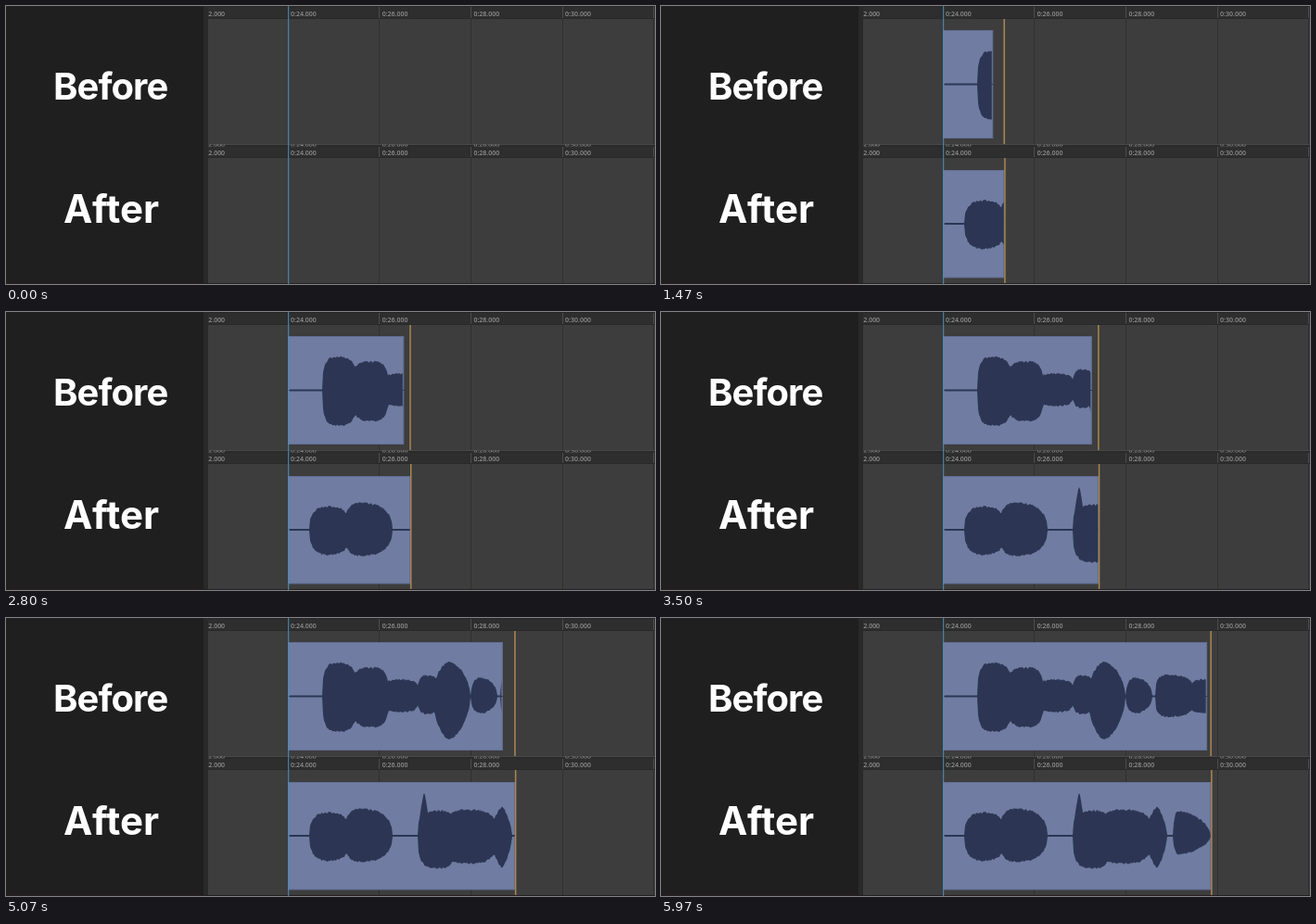
Write an HTML page that moves like this. It is 700 by 300 pixels and loops after 6030 ms.

```html
<!DOCTYPE html>
<html lang="en">
<head>
<meta charset="utf-8">
<title>Before / After</title>
<style>
  html, body { margin: 0; width: 100%; height: 100%; overflow: hidden; background: #1f1f1f; }
  svg { display: block; width: 700px; height: 300px; }
  .title { font-family: Inter, sans-serif; font-weight: 700; fill: #fff; }
  .tick { font: 600 7px "Open Sans", sans-serif; fill: #939393; }
</style>
</head>
<body>
<svg id="stage" viewBox="0 0 700 300"></svg>
<script>
const LOOP = 6030;
const CLIP_LEFT = 304.5;
const CHUNK = 17.76;
const SPEED = .0491;
const WAVE = '#2c3654';
const svg = document.getElementById('stage');

function add(parent, name, attrs, text) {
  const node = document.createElementNS('http://www.w3.org/2000/svg', name);
  for (const key in attrs) node.setAttribute(key, attrs[key]);
  if (text) node.textContent = text;
  parent.appendChild(node);
  return node;
}
const rect = (x, y, width, height, fill, parent = svg) =>
  add(parent, 'rect', { x, y, width, height, fill });

function seeded(seed) {
  return () => (seed = (seed * 16807) % 2147483647) / 2147483647;
}

// A spoken sound: swells from start to peak, fades to end; a high power is boxier.
const sound = (start, peak, end, up, down, power = 3) => ({ start, peak, end, up, down, power });

const beforeSounds = [
  sound(341, 358, 379, 36, 38),
  sound(372, 394, 413, 31, 33),
  sound(405, 425, 446, 18, 17),
  sound(444, 455, 466, 23, 19),
  sound(460, 478, 501, 37, 46, 1.7),
  sound(501, 511, 530, 20, 18, 2),
  sound(533, 548, 575, 23, 22),
  sound(570, 584, 592, 18, 18),
];
const afterSounds = [
  sound(327, 348, 372, 25, 27, 2.5),
  sound(364, 382, 417, 29, 28, 2.4),
  sound(444, 451, 458, 47, 31, 1.2),
  sound(444, 465, 486, 27, 35),
  sound(474, 496, 530, 28, 30),
  sound(522, 535, 546, 31, 34, 1.4),
  sound(552, 557, 593, 27, 20, 1.7),
];

function swell({ start, peak, end, power }, x) {
  const u = x < peak ? (peak - x) / (peak - start) : (x - peak) / (end - peak);
  return u < 1 ? (1 - u ** power) ** (1 / power) : 0;
}

function wavePath(sounds, axis) {
  const random = seeded(23);
  const reach = (x, side) => {
    const size = Math.max(...sounds.map(s => s[side] * swell(s, x)));
    return Math.max(.9, size + Math.min(2, size * .15) * (random() - .5));
  };
  const top = [], bottom = [];
  for (let x = 306; x < 594; x++) {
    top.push(`${x} ${axis - reach(x, 'up')}`);
    bottom.unshift(`${x} ${axis + reach(x, 'down')}`);
  }
  return `M${top.concat(bottom).join('L')}Z`;
}

function drawLabels(parent, y) {
  for (let i = 0; i < 5; i++)
    add(parent, 'text', { class: 'tick', x: 208.3 + 98.7 * i, y }, `0:${22 + 2 * i}.000`);
}

function makeLane(id, top, bottom, clipTop, clipHeight, axis, sounds) {
  rect(218, top, 482, bottom - top, '#3d3d3d');
  rect(218, top, 482, 14, '#2e2e2e');
  rect(218, top + 13, 482, 1, '#292929');
  for (let i = 0; i < 4; i++) {
    const x = Math.round(402.3 + 98.7 * i);
    rect(x, top + 14, 1, bottom - top - 14, '#303030');
    rect(x, top, 1, 13, '#4c4c4c');
  }
  drawLabels(svg, top + 10.7);

  const clip = rect(CLIP_LEFT, clipTop + .5, 0, clipHeight - 1, '#707ca1');
  clip.setAttribute('stroke', '#626e95');
  const mask = rect(CLIP_LEFT, clipTop, 0, clipHeight, '#000', add(svg, 'clipPath', { id }));
  add(svg, 'path', { d: wavePath(sounds, axis), fill: WAVE, 'clip-path': `url(#${id})` });
  const hairline = rect(CLIP_LEFT, axis - .5, 0, 1, WAVE);
  const head = rect(0, top + 14, 1.5, bottom - top - 14, '#a98752');

  return (end, headX, gap) => {
    const width = Math.max(0, end - CLIP_LEFT);
    clip.setAttribute('width', Math.max(0, width - .5));
    clip.setAttribute('visibility', width ? 'visible' : 'hidden');
    hairline.setAttribute('width', width);
    mask.setAttribute('width', Math.max(0, width - gap));
    head.setAttribute('x', headX - .75);
    head.setAttribute('visibility', headX > CLIP_LEFT ? 'visible' : 'hidden');
  };
}

const setBefore = makeLane('beforeMask', 0, 150, 26, 117, 84.5, beforeSounds);
const setAfter = makeLane('afterMask', 150, 299, 177, 116.5, 235, afterSounds);

// Seam between the lanes, with the cut-off feet of a hidden ruler
rect(218, 149, 482, 1, '#474747');
rect(218, 150, 482, 2, '#2b2b2b');
rect(213, 149.4, 487, 2.2, '#000', add(svg, 'clipPath', { id: 'seam' }));
drawLabels(add(svg, 'g', { 'clip-path': 'url(#seam)' }), 151.6);
rect(213, 0, 487, .8, '#242424');
rect(0, 299, 700, 1, '#251f20');
rect(304.2, 0, 1, 300, '#4f8fb9');

// Side panel and titles
rect(0, 0, 213, 299, '#1f1f1f');
rect(213, 0, 5, 299, '#292929');
add(svg, 'text', { class: 'title', x: 51, y: 101.3, 'font-size': 40, 'letter-spacing': -.95 }, 'Before');
add(svg, 'text', { class: 'title', x: 62, y: 234, 'font-size': 42 }, 'After');

// Bursts of 13 refreshes, 1.5 ticks of 1/30 s apart; a short pause follows each burst.
const burstStarts = [3, 22.5, 42, 62.5, 82, 101, 120.5, 139, 159, 179];
const toTime = tick => Math.round(Math.floor(tick) * 10 / 3) * 10;
const times = burstStarts.flatMap(start =>
  Array.from({ length: 13 }, (_, k) => toTime(start + 1.5 * k)));

function draw(now) {
  const clock = now % LOOP;
  const t = Math.max(0, ...times.filter(time => time <= clock));
  const x = 300 + t * SPEED;
  const chunks = Math.max(0, Math.floor((x - 306) / CHUNK));
  setBefore(chunks ? 305 + chunks * CHUNK : 0, x, 1.5);
  setAfter(x, x + .7, .5);
}

const began = performance.now();
function loop() {
  draw(performance.now() - began);
  requestAnimationFrame(loop);
}
loop();
</script>
</body>
</html>
```
